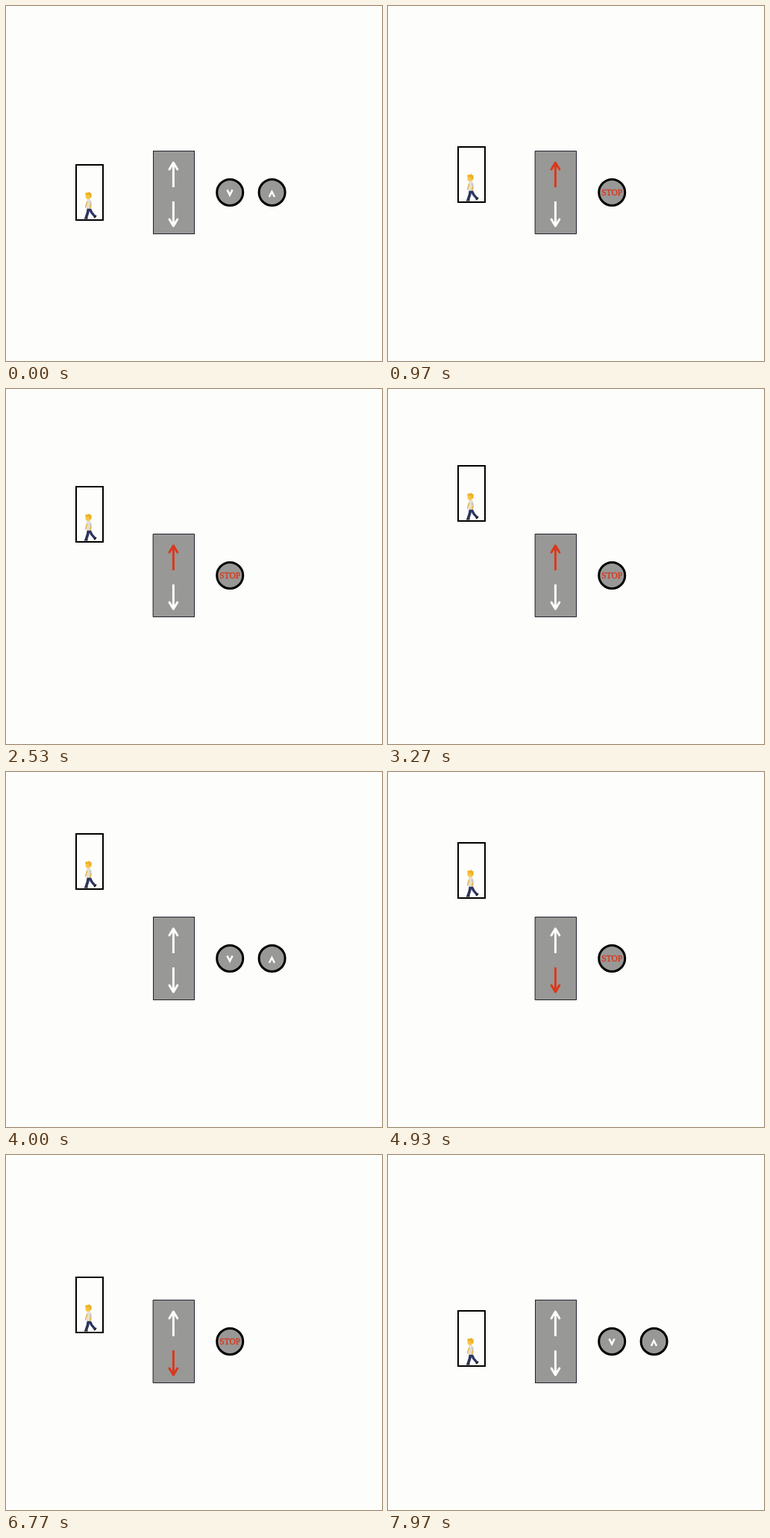
These frames come from a looping animation (504 by 476 pixels, 8000 ms). An HTML page with a canvas:

```html
<!DOCTYPE html>
<html lang="en">
<head>
<meta charset="utf-8">
<title>Lift</title>
<style>
  html, body { margin: 0; width: 100%; height: 100%; overflow: hidden; background: #fdfdfc; }
  canvas { display: block; width: 504px; height: 476px; }
</style>
</head>
<body>
<canvas id="stage" width="504" height="476"></canvas>
<script>
const ctx = document.getElementById('stage').getContext('2d');

const LOOP = 8000;
const UP = { from: 337, press: 352, to: 3690 };
const DOWN = { from: 4605, press: 4585, to: 7920 };
const SPEED = 0.0376;   // px per ms
const GLIDE = 4.2;      // px covered while coasting to rest
const DECAY = 110;      // ms
const FLOOR = 213;

const PAPER = '#fdfdfc', GREY = '#989896', RED = '#da381c', INK = '#000';

// Steady travel, then an exponential coast.
function travel(t, ride) {
  if (t < Math.max(ride.from, ride.press)) return 0;
  const steady = SPEED * (Math.min(t, ride.to) - ride.from);
  const coast = t > ride.to ? GLIDE * (1 - Math.exp((ride.to - t) / DECAY)) : 0;
  return steady + coast;
}

const during = (t, ride) => t >= ride.press && t < ride.to;

function trace(points) {
  ctx.beginPath();
  points.forEach(([x, y]) => ctx.lineTo(x, y));
}

function line(points, color, width) {
  trace(points);
  ctx.strokeStyle = color;
  ctx.lineWidth = width;
  ctx.stroke();
}

function shape(points, color) {
  trace(points);
  ctx.closePath();
  ctx.fillStyle = color;
  ctx.fill();
}

function oval(x, y, rx, ry, color) {
  ctx.beginPath();
  ctx.ellipse(x, y, rx, ry, 0, 0, Math.PI * 2);
  ctx.fillStyle = color;
  ctx.fill();
}

function drawWalker() {
  ctx.lineCap = ctx.lineJoin = 'round';
  // legs and shoes
  line([[17.8, 58], [20.8, 64], [25, 69]], '#2d3560', 3.4);
  line([[16.6, 58], [15.6, 64], [13.6, 70]], '#2d3560', 3.8);
  line([[24.6, 70.6], [26.6, 68.4]], '#25252c', 1.8);
  line([[11.6, 71.6], [15, 71.6]], '#25252c', 1.8);
  // shirt
  shape([[14.6, 46], [18.8, 46], [21, 50], [20.8, 58.8], [14, 58.8], [13.6, 51]], '#e4dfd2');
  // arms
  line([[14.6, 50], [13.2, 54], [12.6, 57]], '#e5b545', 1.5);
  line([[18.8, 49.5], [19.6, 54]], '#c3c0bc', 1.4);
  line([[19.6, 54], [18.6, 58]], '#e5b545', 1.6);
  // head and tufted hair
  oval(16.2, 41.8, 3.7, 4.3, '#f8c444');
  shape([[12.2, 40], [13, 37], [15.5, 37.4], [17.5, 36], [18.8, 37.4], [21, 38.4],
         [20.4, 40.6], [21, 42.6], [18.8, 44], [17, 40.6]], '#eeb026');
}

function drawCabin(top) {
  ctx.save();
  ctx.translate(94, Math.round(top));
  drawWalker();
  ctx.lineCap = 'butt';
  ctx.lineJoin = 'miter';
  ctx.strokeStyle = INK;
  ctx.lineWidth = 2;
  ctx.strokeRect(0, 0, 36, 74);
  ctx.restore();
}

function drawArrow(tip, dir, active) {
  const color = active ? RED : PAPER;
  ctx.lineCap = 'butt';
  ctx.lineJoin = 'round';
  line([[224.4, tip + dir], [224.4, tip + dir * 34]], color, 3);
  ctx.lineCap = 'round';
  line([[219, tip + dir * 10], [224.4, tip + dir], [229.8, tip + dir * 10]], color, 3);
}

function drawPanel(up, down) {
  ctx.fillStyle = GREY;
  ctx.fillRect(197, 194, 56, 112);
  ctx.strokeStyle = '#22222e';
  ctx.lineWidth = 1;
  ctx.strokeRect(197.5, 194.5, 55, 111);
  drawArrow(209, 1, up);
  drawArrow(296, -1, down);
}

function drawButton(x) {
  oval(x, 250, 17.5, 17.5, GREY);
  ctx.strokeStyle = INK;
  ctx.lineWidth = 3;
  ctx.stroke();
}

function drawChevron(x, base, tip) {
  ctx.lineCap = 'butt';
  ctx.lineJoin = 'miter';
  line([[x - 3.6, base], [x, tip], [x + 3.6, base]], PAPER, 2.5);
}

function drawButtons(moving) {
  drawButton(300.2);
  if (moving) {
    ctx.font = '11.5px "Liberation Serif", serif';
    ctx.textAlign = 'center';
    ctx.fillStyle = ctx.strokeStyle = RED;
    ctx.lineWidth = 0.4;
    ctx.fillText('STOP', 300.2, 254);
    ctx.strokeText('STOP', 300.2, 254);
    return;
  }
  drawChevron(300, 246.4, 253.4);
  drawButton(356.6);
  drawChevron(356.4, 256, 249);
}

function draw(now) {
  const t = now % LOOP;
  const up = during(t, UP), down = during(t, DOWN);
  ctx.fillStyle = PAPER;
  ctx.fillRect(0, 0, 504, 476);
  drawCabin(FLOOR - travel(t, UP) + travel(t, DOWN));
  drawPanel(up, down);
  drawButtons(up || down);
}

const start = performance.now();
function tick() {
  draw(performance.now() - start);
  requestAnimationFrame(tick);
}
tick();
</script>
</body>
</html>
```
